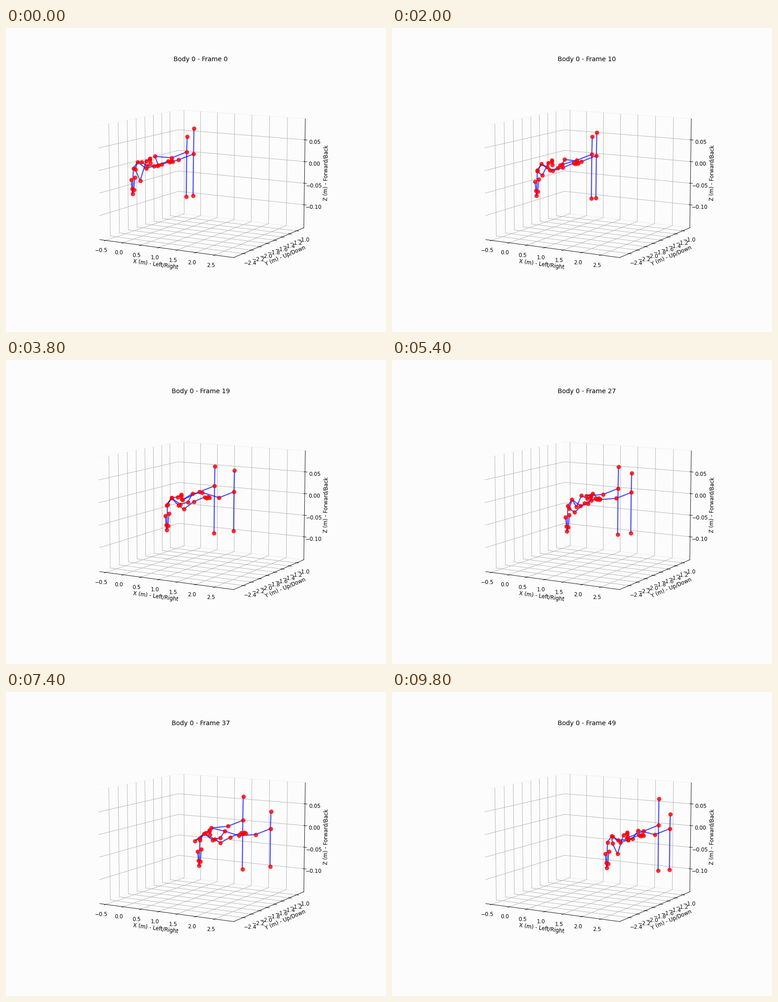
Recreate the animation shown at these times as a matplotlib script. Size 837 px wide and 669 px high, loop 10 s.

```python
import numpy as np
import matplotlib.pyplot as plt
from matplotlib.animation import FuncAnimation
from matplotlib.collections import LineCollection

W, H, DPI = 837, 669, 83.7
COUNT, STEP_MS = 50, 200
BG = "#fcfcfc"

# Rest pose: x from the chest, y on the stage. Right is side -1, left is +1.
SPINE = [(-9, 309), (0, 295), (19, 309), (36, 304), (46, 292)]
FACE = [(-14, 334), (-12, 354), (-11, 365), (-8, 356), (-6, 329)]
ARMS = {
    -1: [(-3, 311), (8, 311), (21, 293), (29, 287), (29, 290), (30, 297)],
    1: [(7, 305), (19, 313), (41, 303), (65, 293), (69, 295), (72, 292), (75, 294)],
}
LEG = [(46, 291), (83, 288), (116, 275)]
CHEST_X, SPEED_X, SPEED_Y = 289.5, 3.96, 0.45

# Half the stance width and the spread of the arms, over time.
GAP = [(0, 7.5), (10, 5), (18, 26), (19, 21.5), (24, 11), (27, 14.5),
       (30, 6), (36, 29), (37, 30.5), (43, 1.5), (49, 12.5)]
REACH = [(0, 2), (10, 6), (19, 8), (27, -13), (37, 17), (43, 3), (49, -5)]


def track(keys, n):
    return np.interp(n, *zip(*keys))


def leg_parts(side, n, gap):
    leg = np.array(LEG, float)
    leg[:, 0] += side * gap
    leg[0, 1] -= side * 10 * np.sin(2 * np.pi * (n - 6) / 37)
    leg[1:, 1] += side * 0.3 * gap
    toe = leg[-1] + (-1, 95 - side * 0.4 * gap)
    heel = leg[-1] + (1, -45 + side * (0.5 * n - 11))
    return np.vstack([leg, toe]), np.array([leg[-1], heel])


def pose(n):
    """Dots and bones of the walker at step n."""
    gap, reach = track(GAP, n), track(REACH, n)
    twist = np.cos(2 * np.pi * n / 52)

    spine = np.array(SPINE, float)
    spine[-1, 1] += 10 * twist
    neck, chest, pelvis = spine[0], spine[1], spine[-1]
    face = np.array(FACE, float)
    chains = [spine, face, np.array([face[2], neck])]
    dots = [spine, face]

    for side, rest in ARMS.items():
        arm = np.array(rest, float)
        arm[:, 0] += side * reach
        if side < 0:
            arm[1, 1] += 25 * twist
        else:
            arm[:2, 1] -= 10 * twist
        leg, heel = leg_parts(side, n, gap)
        chains += [np.vstack([chest, arm]), np.vstack([pelvis, leg]), heel]
        dots += [arm, leg, heel[1:]]

    shift = np.array([CHEST_X + SPEED_X * n, SPEED_Y * n])
    bones = [np.array(pair) + shift for c in chains for pair in zip(c, c[1:])]
    return np.vstack(dots) + shift, bones


# The small excess keeps the pixel size from rounding down.
fig = plt.figure(figsize=((W + 0.01) / DPI, (H + 0.01) / DPI), dpi=DPI, facecolor=BG)

ax = fig.add_subplot(111, projection="3d", facecolor=BG)
ax.view_init(elev=10, azim=-60)
ax.set_xticks(np.arange(-0.5, 2.6, 0.5))
ax.set_yticks(np.linspace(-2.4, -1.0, 8))
ax.set_zticks(np.linspace(-0.10, 0.05, 4))
ax.set_xlim(-0.675, 2.989)
ax.set_ylim(-2.6265, -0.792)
ax.set_zlim(-0.1537, 0.0981)
ax.set_xlabel("X (m) - Left/Right")
ax.set_ylabel("Y (m) - Up/Down")
ax.set_zlabel("Z (m) - Forward/Back")
for axis in (ax.xaxis, ax.yaxis, ax.zaxis):
    axis.pane.set_fill(False)
title = ax.set_title("")

stage = fig.add_axes([0, 0, 1, 1])
stage.set_xlim(0, W)
stage.set_ylim(H, 0)
stage.axis("off")
limbs = LineCollection([], colors="blue", linewidths=2, alpha=0.7, zorder=2)
stage.add_collection(limbs, autolim=False)
joints = stage.scatter([], [], s=50, c="red", alpha=0.8, zorder=3)


def draw(n):
    dots, bones = pose(n)
    limbs.set_segments(bones)
    joints.set_offsets(dots)
    title.set_text(f"Body 0 - Frame {n}")
    return limbs, joints, title


anim = FuncAnimation(fig, draw, frames=COUNT, interval=STEP_MS,
                     repeat=True, repeat_delay=0, blit=False)
plt.show()
```
